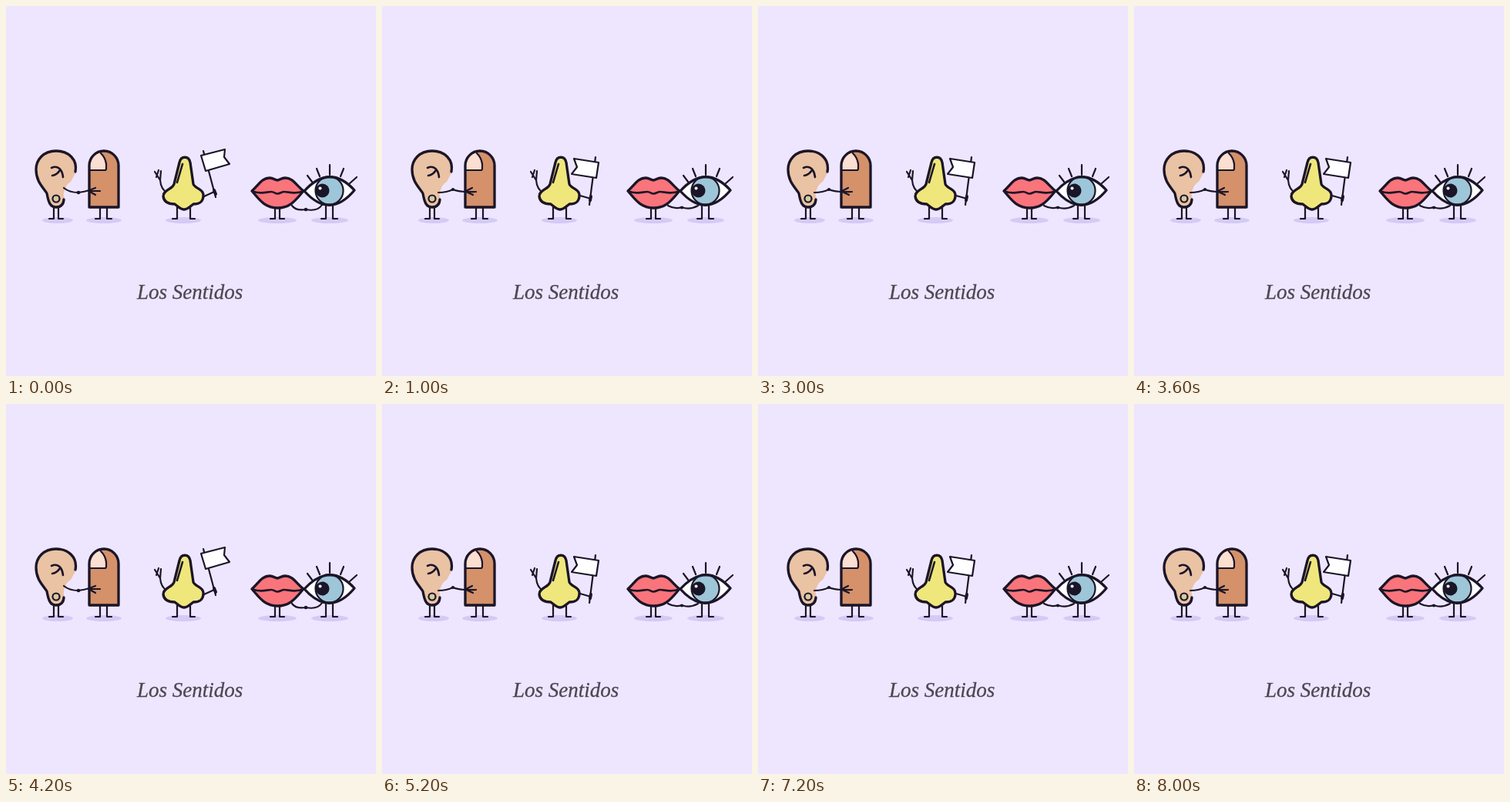
An HTML page for the animation above (8200 ms loop, 480 px wide and 480 px high).

```html
<!DOCTYPE html>
<html lang="es">
<head>
<meta charset="utf-8">
<title>Los Sentidos</title>
<style>
  html, body { margin: 0; height: 100%; overflow: hidden; background: #eee6fe; }
  svg { display: block; width: 100vw; height: 100vh; }
  .ink { stroke: #1b1528; stroke-width: 3.3; stroke-linecap: round; stroke-linejoin: round; fill: none; }
  .thin { stroke-width: 2.2; }
  .mid { stroke-width: 2.6; }
  .shadow { fill: #d3caf5; }
  text { font: italic 27px "Liberation Serif", serif; fill: #4b4652; stroke: #4b4652; stroke-width: .3; }
</style>
</head>
<body>
<svg viewBox="0 0 480 480">
  <g id="stands"></g>

  <!-- ear -->
  <path fill="#eac2a4" d="M91 215C92 198 81 188 65 188C48 188 39 200 39 212C39 228 48 235 53 243C55 254 57 261 65 261C72 261 76 255 75 248C74 240 78 231 84 228Z"/>
  <path class="ink" d="M90 215C93 199 81 188 65 188C48 188 39 200 39 212C39 228 48 235 53 243C55 254 57 261 65 261C71 261 75 257 75 251"/>
  <path class="ink mid" d="M59 210C67 206 73 212 74 222M70 213Q66 219 60 220"/>
  <circle class="ink thin" style="fill:#d3cca0" cx="65" cy="250" r="4.500"/>

  <!-- finger -->
  <path fill="#d4916a" d="M108 261V207a19 19 0 0 1 38 0V261Z"/>
  <path fill="#fbdfd0" d="M109 213V205Q110 194 121 190Q130 196 130 205V213Z"/>
  <path class="ink thin" d="M109 213H128Q130 213 130 211V205Q129 197 123 191"/>
  <path class="ink" d="M108 261V207a19 19 0 0 1 38 0V261Z"/>

  <!-- nose -->
  <path class="ink thin" d="M209 242Q201 238 200 226L193 215M200 226L201 214M195 222L198 213"/>
  <path class="ink" style="fill:#efe77b" d="M225 203C227 194 237 194 239 203L243 231C245 237 257 237 256 247C255 256 249 257 243 257C239 260 236 264 231 264C226 264 223 260 219 257C213 257 205 256 204 247C204 238 216 238 218 231Z"/>
  <path class="ink mid" d="M229 205L222 229"/>

  <!-- lips -->
  <path class="ink" style="fill:#fa747b" d="M319 240C328 232 332 223 342 223C347 223 349 226 352 226C355 226 357 223 362 223C372 223 376 232 386 240C377 250 370 262 352 262C335 262 328 250 319 240Z"/>
  <path class="ink mid" d="M319 240C330 245 338 241 344 241C348 241 349 243.500 352 243.500C356 243.500 357 241 361 241C367 241 375 245 386 240"/>

  <!-- eye -->
  <path class="ink thin" d="M391 220L397 228M403 211L407 221M420 206V219M438 211L434 221M455 222L446 230"/>
  <path fill="#fff" d="M387 240Q420 204 452 239Q420 277 387 240Z"/>
  <circle class="ink thin" style="fill:#9dc6d8" cx="419.500" cy="239.500" r="18"/>
  <circle fill="#1b1528" cx="410.500" cy="239.500" r="9"/>
  <circle fill="#fff" cx="407.500" cy="236.500" r="2"/>
  <path class="ink" d="M387 240Q420 204 452 239Q420 277 387 240Z"/>

  <g class="ink thin pose">
    <path d="M75 236Q82 242 94 242Q102 241 108 239M107 240H122M108 239L116 236M109 241L116 245"/>
    <circle cx="94" cy="242" r="1.200"/>
    <path d="M257 247L270 241"/>
    <path d="M256 188L272 248"/>
    <path fill="#fff" d="M253 194L284 186L283 196L290 205L259 214Z"/>
    <path style="stroke-width:4" d="M270 239L272 244"/>
    <path d="M371 259Q376 266 389 264Q404 267 410 258"/>
    <circle cx="389" cy="264" r="1.200"/>
  </g>
  <g class="ink thin pose">
    <path d="M73 242Q84 242 92 238Q101 242 122 241M109 240L117 236M109 241L118 245"/>
    <circle cx="92" cy="238" r="1"/>
    <path d="M257 246L271 250"/>
    <path d="M277 196L269 258"/>
    <path fill="#fff" d="M249 198L281 203L278 223L246 218L253 209Z"/>
    <path style="stroke-width:4" d="M271 247L270 252"/>
    <path d="M371 259Q380 264 389 261Q399 265 410 259"/>
    <circle cx="389" cy="261.500" r="1"/>
  </g>

  <text x="170" y="380">Los Sentidos</text>
</svg>
<script>
  // The two poses swap every HOLD ms; the first swap comes at FIRST.
  const LOOP = 8200, HOLD = 353, FIRST = 18;

  // shadow centre, shadow radius, left leg, right leg
  const stands = [[67, 20, 62, 68], [127, 23, 122, 131], [230, 23, 222, 239], [352, 25, 349, 355], [420, 24, 415, 424]];
  document.getElementById("stands").innerHTML = stands.map(([x, r, left, right]) =>
    `<ellipse class="shadow" cx="${x}" cy="278" rx="${r}" ry="4"/>
     <path class="ink thin" d="M${left} 258V276h-6M${right} 258V276h6"/>`).join("");

  const poses = document.querySelectorAll(".pose");
  const start = performance.now();

  function draw() {
    const t = (performance.now() - start) % LOOP;
    const active = Math.ceil((t - FIRST) / HOLD) & 1;
    poses.forEach((pose, i) => pose.setAttribute("visibility", i === active ? "visible" : "hidden"));
    requestAnimationFrame(draw);
  }
  draw();
</script>
</body>
</html>
```
